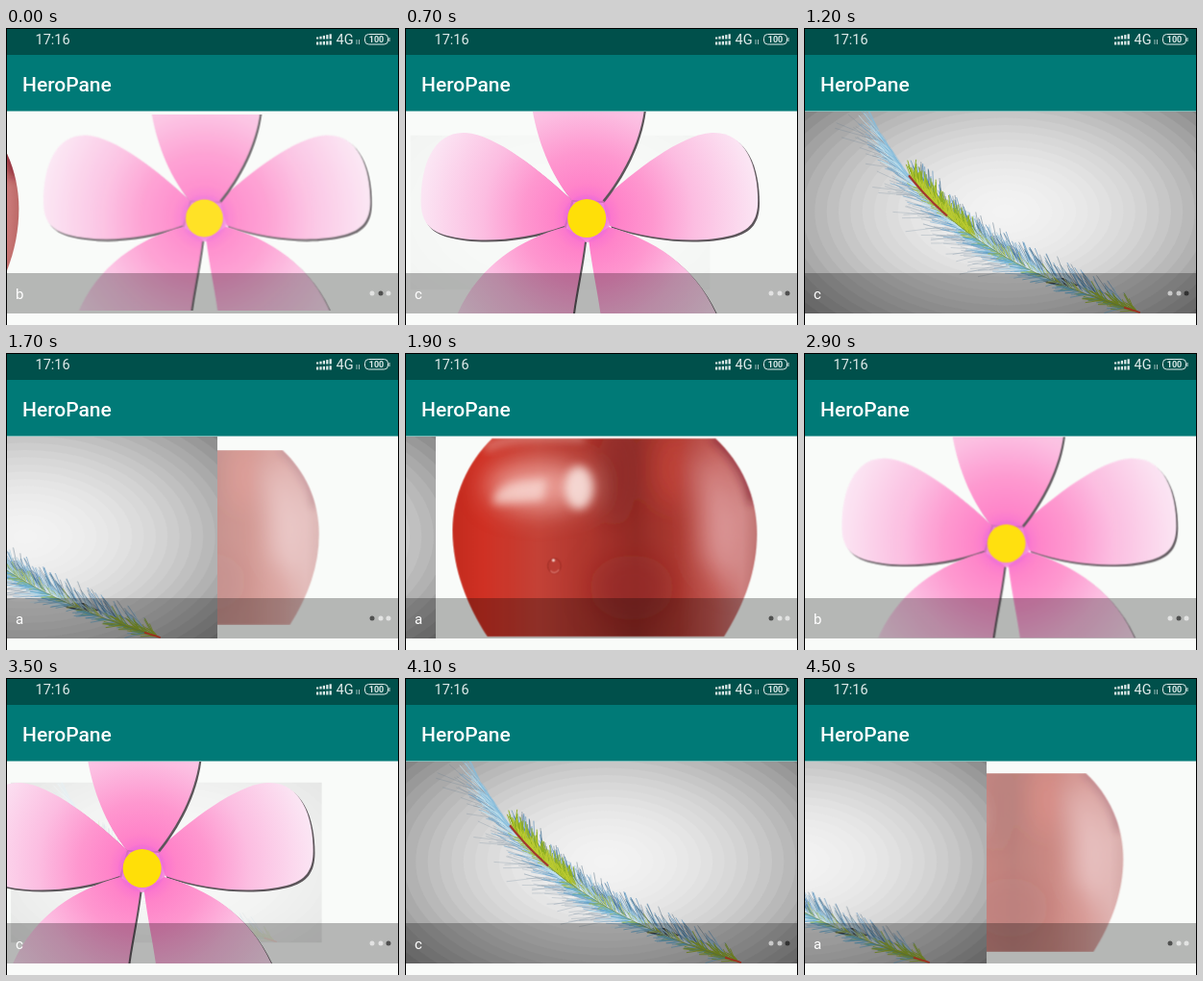
These frames come from a looping animation (409x309 px, 4.6 s). An HTML page:

```html
<!DOCTYPE html>
<html lang="en">
<head>
<meta charset="utf-8">
<title>Carousel</title>
<style>
  html, body { margin: 0; width: 100%; height: 100%; overflow: hidden; background: #fafafa; }
  svg { display: block; width: 100vw; height: 100vh; }
  text { font-family: Roboto, Arial, sans-serif; fill: #fff; }
  .status text { fill: #e0ebea; }
</style>
</head>
<body>
<svg viewBox="0 0 409 309">
  <defs>
    <clipPath id="page"><rect x="1" y="87" width="408" height="210"/></clipPath>
    <clipPath id="fruit"><use href="#fruitShape"/></clipPath>
    <filter id="soft" x="-60%" y="-60%" width="220%" height="220%"><feGaussianBlur stdDeviation="5"/></filter>
    <filter id="softer" filterUnits="userSpaceOnUse" x="0" y="40" width="409" height="300"><feGaussianBlur stdDeviation="14"/></filter>
    <linearGradient id="skin">
      <stop offset="0" stop-color="#bf1a0c"/>
      <stop offset=".1" stop-color="#cc2012"/>
      <stop offset=".28" stop-color="#bf3226"/>
      <stop offset=".45" stop-color="#a8261d"/>
      <stop offset=".6" stop-color="#8c1c15"/>
      <stop offset=".74" stop-color="#a62a21"/>
      <stop offset=".86" stop-color="#bd4c46"/>
      <stop offset=".95" stop-color="#c97270"/>
      <stop offset="1" stop-color="#b96664"/>
    </linearGradient>
    <radialGradient id="petalFill" gradientUnits="userSpaceOnUse" cx="0" cy="0" r="180">
      <stop offset=".1" stop-color="#f96fd0"/>
      <stop offset=".2" stop-color="#ff84c9"/>
      <stop offset=".38" stop-color="#fe97cf"/>
      <stop offset=".62" stop-color="#fcbde1"/>
      <stop offset="1" stop-color="#fbe6f4"/>
    </radialGradient>
    <radialGradient id="glow">
      <stop offset=".7" stop-color="#e468e0"/>
      <stop offset="1" stop-color="#f774d0" stop-opacity=".7"/>
    </radialGradient>
  </defs>

  <rect width="409" height="309" fill="#f9fbf9"/>

  <g clip-path="url(#page)">
    <g id="slides">
      <g clip-path="url(#page)">
        <path id="fruitShape" fill="url(#skin)" d="M92 87C66 112 50 148 50 184C50 226 66 265 87 297H338C360 262 373 226 373 188C373 148 356 112 329 87Z"/>
        <g clip-path="url(#fruit)">
          <g filter="url(#softer)">
            <ellipse cx="225" cy="125" rx="20" ry="60" fill="#7a1410" opacity=".5"/>
            <ellipse cx="240" cy="245" rx="45" ry="35" fill="#8a1710" opacity=".5"/>
            <ellipse cx="282" cy="118" rx="14" ry="42" fill="#c8382e" opacity=".8"/>
            <path d="M318 105L352 170L346 235L322 210Z" fill="#e0a2a4" stroke="#e0a2a4" stroke-width="12" opacity=".75"/>
            <ellipse cx="142" cy="138" rx="56" ry="25" fill="#f0a59c" opacity=".9"/>
          </g>
          <path d="M84 98C110 82 160 84 190 86" fill="none" stroke="#e3a09a" stroke-width="9" opacity=".6" filter="url(#soft)"/>
          <path d="M326 84C350 104 364 128 369 155" fill="none" stroke="#7d1826" stroke-width="10" opacity=".8" filter="url(#soft)"/>
          <path d="M93 156C93 138 112 131 150 130L146 152Q112 156 93 156Z" fill="#f8d9d3" opacity=".75" filter="url(#soft)"/>
          <ellipse cx="184" cy="139" rx="15" ry="23" fill="#f9e4df" opacity=".85" filter="url(#soft)"/>
        </g>
        <ellipse cx="158" cy="222" rx="7" ry="8" fill="#b52c22" stroke="#951d15"/>
        <path d="M154 227Q158 232 163 226" fill="none" stroke="#d5675d" stroke-width="1.500"/>
        <circle cx="157" cy="216" r="1.700" fill="#f0c5be"/>
      </g>

      <g clip-path="url(#page)">
        <g id="flower" transform="translate(212 198)"></g>
      </g>

      <g clip-path="url(#page)" id="feather"></g>
    </g>
  </g>

  <rect x="1" y="255" width="408" height="42" fill="#000" opacity=".27"/>
  <text id="caption" x="10" y="282" font-size="15"></text>
  <g id="dots"></g>

  <rect width="409" height="28" fill="#00504b"/>
  <rect y="28" width="409" height="58.500" fill="#007a77"/>
  <text x="17" y="65.500" font-size="21" font-weight="500">HeroPane</text>
  <g class="status">
    <text x="30.500" y="17" font-size="14.500">17:16</text>
    <g id="signal" fill="#e0ebea"></g>
    <text x="343.500" y="17" font-size="14.500">4G</text>
    <path d="M365 12v5M367.500 12v5" stroke="#9dbcba"/>
    <rect x="373.500" y="6.500" width="24" height="10.500" rx="4" fill="none" stroke="#e0ebea"/>
    <path d="M399 10v4" stroke="#e0ebea"/>
    <text x="385.500" y="15" font-size="9" font-weight="700" text-anchor="middle">100</text>
  </g>
  <path d="M0 .5H409M.5 0V309M408.500 0V309" stroke="#000"/>
</svg>

<script>
const LOOP = 4600, STEP = 100, DURATION = 700, WIDTH = 408;
const STARTS = [-243, 692, 1618, 2544, 3474, 4400];
const LABELS = ['a', 'b', 'c'];
const byId = id => document.getElementById(id);

function add(parent, tag, attrs) {
  const node = document.createElementNS('http://www.w3.org/2000/svg', tag);
  for (const key in attrs) node.setAttribute(key, attrs[key]);
  return parent.appendChild(node);
}

let seed = 11;
const random = () => (seed = seed * 16807 % 2147483647) / 2147483647;
const between = (low, high) => low + (high - low) * random();

function drawFlower() {
  const flower = byId('flower');
  const side = 'M24 8C70 24 118 26 150 18C170 13 178 2 178 -18C178 -56 164 -91 130 -89C98 -87 50 -50 16 -19Z';
  const top = 'M-16 -19C-40 -48 -52 -85 -57 -115H60C56 -80 38 -45 16 -18Z';
  const low = 'M2 23C6 55 12 80 15 105H137C115 50 70 22 23 9Z';
  const petals = [[side, 1], [side, -.97], [top, 1], [low, 1], [low, -1]];
  for (const [d, flip] of petals) {
    const transform = `scale(${flip} 1)`;
    const shadow = add(flower, 'g', { transform: 'translate(1.8 2)' });
    add(shadow, 'path', { d, transform, fill: '#5c555a' });
    add(flower, 'path', { d, transform, fill: 'url(#petalFill)' });
  }
  add(flower, 'circle', { r: 25, fill: 'url(#glow)' });
  add(flower, 'circle', { r: 20, fill: '#ffdf08' });
}

// Point and unit tangent of the quill at t.
function quill(t) {
  const cubic = (a, b, c, d) => {
    const s = 1 - t;
    return [s*s*s*a + 3*s*s*t*b + 3*s*t*t*c + t*t*t*d,
            3*s*s*(b - a) + 6*s*t*(c - b) + 3*t*t*(d - c)];
  };
  const [x, dx] = cubic(70, 118, 186, 350), [y, dy] = cubic(92, 184, 246, 296);
  const length = Math.hypot(dx, dy);
  return { x, y, dx: dx / length, dy: dy / length };
}

// Barbs point back along the quill, turned by an angle in degrees.
function barbs(count, range, angles, lengths, skip, color, width, opacity = 1) {
  let d = '';
  for (let i = 0; i < count; i++) {
    const t = between(...range), q = quill(t);
    const turn = between(...angles) * Math.PI / 180;
    const size = between(...lengths);
    const cos = Math.cos(turn), sin = Math.sin(turn);
    const vx = -q.dx * cos + q.dy * sin, vy = -q.dx * sin - q.dy * cos;
    const x = q.x + vx * size * skip, y = q.y + vy * size * skip;
    const bend = between(-2, 2);
    d += `M${x.toFixed(1)} ${y.toFixed(1)}Q${(q.x + vx * size * (skip + 1) / 2 + bend).toFixed(1)} ` +
         `${(q.y + vy * size * (skip + 1) / 2 - bend).toFixed(1)} ` +
         `${(q.x + vx * size).toFixed(1)} ${(q.y + vy * size).toFixed(1)}`;
  }
  add(byId('feather'), 'path', { d, fill: 'none', stroke: color, 'stroke-width': width, opacity });
}

function stem(from, to, color, width) {
  let d = 'M';
  for (let i = 0; i <= 12; i++) {
    const q = quill(from + (to - from) * i / 12);
    d += `${q.x.toFixed(1)} ${q.y.toFixed(1)} `;
  }
  add(byId('feather'), 'path', { d, fill: 'none', stroke: color, 'stroke-width': width });
}

function drawFeather() {
  const feather = byId('feather');
  const rings = 22;
  add(feather, 'rect', { x: 1, y: 87, width: WIDTH, height: 210, fill: '#868686' });
  for (let i = rings; i > 0; i--) {
    const k = i / rings, gray = Math.round(243 - 109 * k * k);
    add(feather, 'ellipse', { cx: 209, cy: 191, rx: 272 * k, ry: 165 * k, fill: `rgb(${gray},${gray},${gray})` });
  }
  add(feather, 'path', { d: 'M244 261Q265 272 286 268L270 260Z', fill: '#444' });
  // Loose wisps below the quill.
  barbs(110, [.1, .72], [-45, -14], [25, 58], 0, '#58748a', .4, .55);
  barbs(120, [.06, .8], [-34, -6], [15, 42], 0, '#5d9fce', .6, .75);
  barbs(120, [.08, .8], [-28, -3], [12, 36], 0, '#c3e2ee', .8, .85);
  barbs(50, [.02, .3], [-14, 6], [10, 34], 0, '#86bcdc', .6, .8);
  // Blue tips above it, then the green down.
  barbs(170, [.3, .99], [18, 46], [20, 36], .1, '#4a86b4', .65, .9);
  barbs(120, [.3, .98], [16, 44], [18, 32], .2, '#9cc6db', .7, .9);
  barbs(60, [.3, .95], [20, 48], [22, 38], .3, '#38566d', .5, .8);
  barbs(170, [.27, .55], [14, 46], [13, 27], 0, '#8fae20', .9);
  barbs(80, [.27, .55], [12, 42], [9, 20], 0, '#bccb31', .9);
  barbs(55, [.55, .92], [14, 44], [8, 18], 0, '#a2b845', .7);
  barbs(70, [.55, .9], [-20, 40], [8, 22], 0, '#b9dbe6', .6);
  barbs(70, [.91, 1], [-25, 45], [8, 24], 0, '#8ea62a', .9);
  barbs(70, [.3, .9], [-34, -8], [6, 16], 0, '#9eb83a', .7);
  barbs(70, [.5, .97], [-36, -8], [8, 22], 0, '#5aa5cd', .6);
  stem(.24, .43, '#a2382f', 2.2);
  stem(.43, .97, '#6f8b5c', .7);
  stem(.965, 1, '#d8402f', 1.8);
}

function drawSignal() {
  for (let i = 0; i < 5; i++) {
    add(byId('signal'), 'rect', { x: 323 + i * 3.4, y: 9.5 - i * .8, width: 2.2, height: 2 + i * .8 });
    add(byId('signal'), 'rect', { x: 323 + i * 3.4, y: 14.5 - i * .3, width: 2.2, height: 3 + i * .3 });
  }
}

drawFlower();
drawFeather();
drawSignal();
const slides = [...byId('slides').children];
const dots = [381, 390, 398].map(cx => add(byId('dots'), 'circle', { cx, cy: 276, r: 2.5 }));

function render(now) {
  const time = Math.floor(now % LOOP / STEP) * STEP;
  const turn = STARTS.findLastIndex(start => start <= time);
  const progress = Math.min(1, (time - STARTS[turn]) / DURATION);
  const rest = (1 - progress) ** 5;
  const leaving = turn % 3, current = (turn + 1) % 3;

  slides.forEach((slide, i) => {
    const visible = i === current || i === leaving && rest > .0005;
    slide.setAttribute('display', visible ? 'inline' : 'none');
  });
  const scale = 1 - .25 * rest;
  slides[current].setAttribute('transform',
    `translate(${204.5 - 46 * rest} 192) scale(${scale}) translate(-204.5 -192)`);
  slides[current].setAttribute('opacity', 1 - rest);
  slides[leaving].setAttribute('transform', `translate(${-WIDTH * (1 - rest)} 0)`);
  slides[leaving].setAttribute('opacity', 1);
  // The leaving slide stays on top of the one growing in.
  if (byId('slides').lastElementChild !== slides[leaving]) byId('slides').append(slides[leaving]);

  byId('caption').textContent = LABELS[current];
  dots.forEach((dot, i) => dot.setAttribute('fill', i === current ? 'rgba(0,0,0,.56)' : 'rgba(255,255,255,.6)'));
}

function tick(now) {
  render(now);
  requestAnimationFrame(tick);
}
render(0);
requestAnimationFrame(tick);
</script>
</body>
</html>
```
